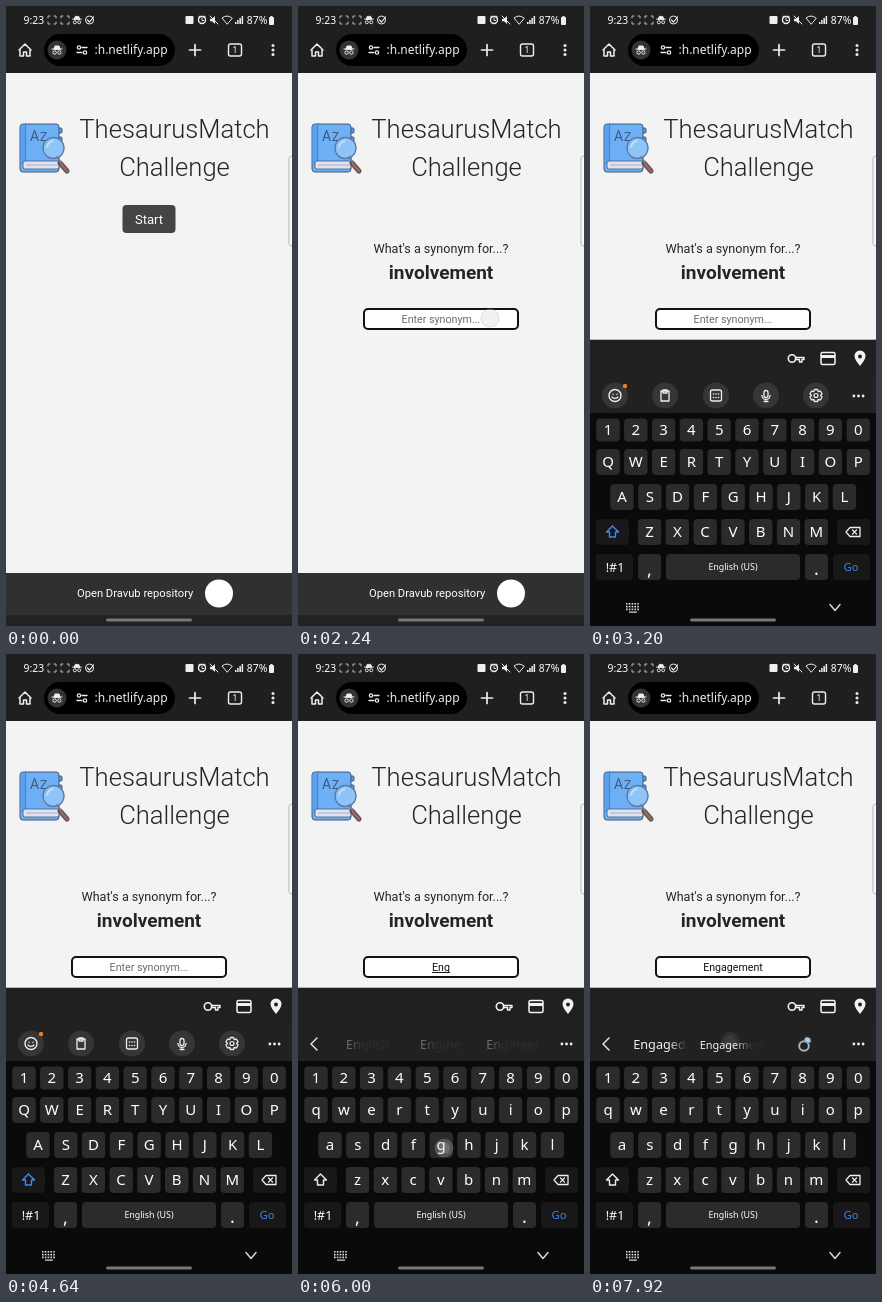
An HTML page with a canvas for the animation above (8000 ms loop, 286x620 px).

```html
<!DOCTYPE html>
<html lang="en">
<head>
<meta charset="utf-8">
<title>ThesaurusMatch Challenge</title>
<style>
html, body { margin: 0; width: 100%; height: 100%; overflow: hidden; background: #1f1f1f; }
canvas { display: block; width: 286px; height: 620px; }
</style>
</head>
<body>
<canvas id="stage"></canvas>
<script>
const W = 286, H = 620, LOOP = 8000;
const canvas = document.getElementById('stage');
const g = canvas.getContext('2d');
const dpr = window.devicePixelRatio || 1;
canvas.width = W * dpr;
canvas.height = H * dpr;

const PAGE_FONT = 'Roboto, sans-serif';
const UI_FONT = '"Noto Sans", sans-serif';
const clamp = v => Math.max(0, Math.min(1, v));
const ramp = (t, start, length) => clamp((t - start) / length);
const mix = (a, b, p) => Math.round(a + (b - a) * p);

function rect(x, y, w, h, fill, radius = 0, stroke, width = 1) {
  g.beginPath();
  g.roundRect(x, y, w, h, radius);
  if (fill) { g.fillStyle = fill; g.fill(); }
  if (stroke) { g.strokeStyle = stroke; g.lineWidth = width; g.stroke(); }
}

function circle(x, y, r, fill, stroke, width = 1) {
  rect(x - r, y - r, 2 * r, 2 * r, fill, r, stroke, width);
}

function text(s, x, y, size, fill = '#fff', font = UI_FONT, weight = 400, align = 'center') {
  g.font = `${weight} ${size}px ${font}`;
  g.textAlign = align;
  g.fillStyle = fill;
  g.fillText(s, x, y);
}

function icon(d, x, y, stroke = '#eee', width = 1.2, fill) {
  const path = new Path2D(d);
  g.save();
  g.translate(x, y);
  g.lineCap = g.lineJoin = 'round';
  if (fill) { g.fillStyle = fill; g.fill(path); }
  if (stroke) { g.strokeStyle = stroke; g.lineWidth = width; g.stroke(path); }
  g.restore();
}

const ICONS = {
  home: 'M-6 0 0-6 6 0M-5-1V6H-1.5V2H1.5V6H5V-1',
  scan: 'M-4-2V-4H-2M2-4H4V-2M4 2V4H2M-2 4H-4V2',
  hat: 'M-5-1H5M-3-1-2-4H2L3-1Z',
  check: 'M-2 0 0 2 4-3',
  alarm: 'M-3.5-3-2-4M3.5-3 2-4M0-1.5V.5H1.5',
  mute: 'M-4-1.3H-2L1-4V4L-2 1.3H-4Z',
  wifi: 'M0 4-5-2Q0-6 5-2Z',
  sliders: 'M0-2.5H5M-5 2.5H0',
  pin: 'M0 8C-3 4-5.5 1-5.5-2A5.5 5.5 0 0 1 5.5-2C5.5 1 3 4 0 8Z',
  key: 'M-.5-1H8V1H6V3.5H3.5V1H-.5',
  smile: 'M-3 1.5Q0 4.5 3 1.5M-2-1.5V-1M2-1.5V-1',
  clipboard: 'M-4-4.5H4V5.5H-4ZM-2-5.5H2V-2.5H-2Z',
  mic: 'M-2-3A2 2 0 0 1 2-3V0A2 2 0 0 1-2 0ZM-4 0A4 4 0 0 0 4 0M0 4V6M-2 6H2',
  gear: 'M-1.5-6H1.5L2.2-4 4.5-4.3 6-1.7 4.6 0 6 1.7 4.5 4.3 2.2 4 1.5 6H-1.5L-2.2 4-4.5 4.3-6 1.7-4.6 0-6-1.7-4.5-4.3-2.2-4Z',
  shift: 'M0-6 6 0H3V5H-3V0H-6Z',
  erase: 'M-7 0-3-4.5H7V4.5H-3ZM-.5-2 3.5 2M3.5-2-.5 2',
  back: 'M3-6-3 0 3 6',
  down: 'M-5-3 0 3 5-3'
};

function drawIncognito(x, y, s = 1) {
  g.save();
  g.translate(x, y);
  g.scale(s, s);
  icon(ICONS.hat, 0, 0, '#eee', 1, '#eee');
  circle(-2.4, 2.5, 1.7, null, '#eee');
  circle(2.4, 2.5, 1.7, null, '#eee');
  g.restore();
}

function drawBrowser() {
  rect(0, 0, W, 67, '#1f1f1f');
  text('9:23', 17.5, 17.7, 10.4, '#fff', UI_FONT, 500, 'left');
  icon(ICONS.scan, 46, 14, '#bbb', 1);
  icon(ICONS.scan, 59, 14, '#bbb', 1);
  drawIncognito(71, 14, .9);
  circle(83.5, 14, 4, null, '#eee');
  icon(ICONS.check, 83.5, 14, '#eee', 1.2);
  rect(179.5, 10, 8, 8, '#eee', 1);
  circle(196, 14, 3.5, null, '#eee', 1.4);
  icon(ICONS.alarm, 196, 14, '#eee', 1);
  icon(ICONS.mute, 208, 14, null, 1, '#eee');
  icon('M-4-4 4 4', 208, 14, '#eee', 1);
  icon(ICONS.wifi, 221, 14, '#eee', 1);
  for (let i = 0; i < 4; i++) rect(229 + 2.2 * i, 16 - 2 * i, 1.5, 2 + 2 * i, '#eee');
  text('87%', 251, 17.7, 10.4, '#fff', UI_FONT, 500);
  rect(263, 11, 5, 8, '#eee', 1);
  rect(264.5, 10, 2, 1, '#eee');

  icon(ICONS.home, 19, 44, '#eee', 1.5);
  rect(38, 28, 131, 32, '#000', 16);
  circle(51, 44, 9.5, '#333');
  drawIncognito(51, 44);
  icon(ICONS.sliders, 76, 44, '#eee', 1.3);
  circle(73, 41.5, 1.7, null, '#eee', 1.2);
  circle(79, 46.5, 1.7, null, '#eee', 1.2);
  text(':h.netlify.app', 88.5, 48, 12, '#eee', UI_FONT, 400, 'left');
  icon('M-5.5 0H5.5M0-5.5V5.5', 189, 44, '#eee', 1.7);
  rect(222.5, 38, 13, 12, null, 2, '#eee', 1.4);
  text('1', 229, 47.3, 8.5);
  for (let i = -1; i < 2; i++) circle(267, 44 + 4.5 * i, 1.5, '#eee');
}

function drawBook() {
  const ink = '#41587c';
  rect(50, 122, 6, 5, '#5f9ade', 1, ink);
  rect(50, 131, 6, 5, '#5f9ade', 1, ink);
  rect(14, 118, 39, 48, '#6db0f6', 3, ink);
  rect(14.5, 118.5, 6, 40, '#5c9fec', 2);
  rect(19, 117.5, 1, 40, '#4d83c4');
  rect(17, 155, 36, 8, '#dfe3f0', 2, ink, .8);
  rect(20, 158.5, 32, 1, '#a9aecb');
  text('A', 28.5, 135, 14, ink, PAGE_FONT);
  text('Z', 37.5, 135, 12, ink, PAGE_FONT);
  icon('M54 157 61 165', 0, 0, '#5b4c50', 5);
  icon('M55 158 61 165', 0, 0, '#96685f', 2.8);
  circle(47.5, 142, 10.5, '#8fc4f8', '#5a7ba6', 1.3);
  icon('M41 141Q42 136 47 135', 0, 0, '#c9e3fc', 1.5);
  icon('M51 151 55 157', 0, 0, '#6e7f99', 2);
}

function drawInput(value, composing) {
  rect(66, 303, 154, 20, '#fff', 4, '#111', 2);
  if (!value) return text('Enter synonym...', 143, 316.7, 10.7, '#6c6c6c', PAGE_FONT);
  text(value, 143, 316.7, 10.65, '#111', PAGE_FONT);
  const width = g.measureText(value).width;
  if (composing) rect(143 - width / 2, 318, width, 1, '#111');
}

const entries = [
  [0, ''], [5060, 'E'], [5430, 'En'], [5910, 'Eng'], [6150, 'Enga'],
  [6390, 'Engag'], [6710, 'Engage'], [7800, 'Engagement']
];

function drawPage(t) {
  rect(0, 67, W, 500, '#f3f3f3');
  drawBook();
  text('ThesaurusMatch', 168.5, 132, 25.6, '#252525', PAGE_FONT, 300);
  text('Challenge', 168.5, 170, 25.6, '#252525', PAGE_FONT, 300);
  if (t < 300) {
    rect(116.5, 199, 53, 28, t > 80 ? '#4d4d4d' : '#444', 4);
    text('Start', 143, 217.7, 13.1, '#fff', PAGE_FONT);
  } else {
    g.globalAlpha = ramp(t, 270, 150);
    text("What's a synonym for...?", 143, 247, 12.6, '#252525', PAGE_FONT);
    text('involvement', 143, 273, 19, '#252525', PAGE_FONT, 700);
    const value = entries.findLast(e => t >= e[0])[1];
    drawInput(value, t < 7800);
    g.globalAlpha = 1;
  }
  rect(283, 150, 8, 90, '#fafafa', 3, '#b5b5b5');
  rect(0, 567, W, 42, '#303030');
  rect(0, 609, W, 11, '#222');
  text('Open Dravub repository', 71, 591, 11.2, '#fff', PAGE_FONT, 400, 'left');
  circle(213, 587.5, 14, '#fff');
}

// Centre of every letter key, by lower-case label
const keys = {};
[['1234567890', 18, 424], ['qwertyuiop', 18, 456], ['asdfghjkl', 32, 491], ['zxcvbnm', 59.5, 526]]
  .forEach(([row, x, y]) => [...row].forEach((label, i) => keys[label] = [x + 27.8 * i, y]));

const presses = [
  ['e', 76, 452, 4950, 5060], ['n', 205, 529, 5310, 5430], ['g', 146, 494, 5830, 5910],
  ['a', 36, 492, 6070, 6150], ['g', 146, 492, 6310, 6390], ['e', 82, 447, 6590, 6710]
];
const taps = [
  ...presses.map(p => p.slice(1)),
  [145, 214, 70, 210], [192, 312, 2070, 2180], [140, 387, 7500, 7790]
];

// [start, left, middle, right]
const suggestions = [
  [5290, 'Everything', 'Email', 'Even'],
  [5520, 'Enough', 'Enjoy', 'End'],
  [5960, 'English', 'Engine', 'Engineer'],
  [6180, 'Engage', 'Engaged', 'Engaging'],
  [6400, 'Engaged', 'Engagement', 'Engage'],
  [6760, 'Engaged', 'Engagement', 'ring'],
  [7800, 'Engaged', 'Engagement', 'ring']
];

function drawRing(x, y) {
  circle(x - 1, y + 2, 4.8, null, '#aab4c0', 2);
  icon('M-2-2 0-5 4-4 5 0 2 1Z', x + 1, y - 2, '#557c9c', .6, '#a5cfe8');
}

// Words too wide for their slot are set smaller; each is uncovered from its left edge.
function drawSuggestions(t) {
  icon(ICONS.back, 16, 390, '#eee', 1.4);
  const [start, ...words] = suggestions.findLast(s => t >= s[0]);
  const alpha = ramp(t, start, 110);
  const edge = .43 * (t - start);
  words.forEach((word, i) => {
    const x = [69.5, 142.5, 215][i];
    if (word === 'ring') return drawRing(x, 390);
    g.font = `12.7px ${UI_FONT}`;
    const fullWidth = g.measureText(word).width;
    const size = 12.7 * Math.min(1, 65.5 / fullWidth);
    const width = Math.min(fullWidth, 65.5);
    const wipe = g.createLinearGradient(x - width / 2, 0, x + width / 2, 0);
    wipe.addColorStop(clamp((edge - 16) / width), `rgba(240,240,240,${alpha})`);
    wipe.addColorStop(clamp(edge / width), `rgba(240,240,240,${edge > width + 16 ? 1 : .05})`);
    text(word, x, 394.5, size, wipe);
  });
}

function drawTools() {
  [25, 75, 126, 176, 226].forEach(x => circle(x, 389.5, 13, '#363636'));
  circle(25, 389.5, 6, null, '#eee', 1.4);
  icon(ICONS.smile, 25, 389.5, '#eee', 1.2);
  icon(ICONS.clipboard, 75, 389.5, '#eee', 1.3);
  rect(120.5, 384, 11, 11, null, 2, '#eee', 1.3);
  for (let i = 0; i < 6; i++) circle(123.5 + 2.5 * (i % 3), 388 + 3.5 * (i / 3 | 0), .8, '#eee');
  icon(ICONS.mic, 176, 389.5, '#eee', 1.3);
  icon(ICONS.gear, 226, 389.5, '#eee', 1.3);
  circle(226, 389.5, 2, null, '#eee', 1.2);
  circle(35, 380, 2.2, '#f37a25');
}

function drawKeys(t) {
  const caps = t < 5060;
  const held = presses.find(p => t >= p[3] && t < p[4]);
  for (const [label, [x, y]] of Object.entries(keys)) {
    const h = y === 424 ? 23 : 26;
    rect(x - 11.7, y - h / 2, 23.4, h, held && held[0] === label ? '#444' : '#2b2b2b', 4);
    text(caps ? label.toUpperCase() : label, x, y + 5.2, 15, '#fff', UI_FONT, 500);
  }
  const dark = '#181818';
  rect(6, 513, 33, 26, dark, 4);
  rect(247, 513, 33, 26, dark, 4);
  rect(6, 548, 37, 26, dark, 4);
  rect(243, 548, 37, 26, dark, 4);
  rect(48, 548, 23, 26, '#2b2b2b', 4);
  rect(76, 548, 134, 26, '#2b2b2b', 4);
  rect(215, 548, 23, 26, '#2b2b2b', 4);
  icon(ICONS.shift, 22.5, 526, caps ? '#4387f5' : '#eee', 1.4);
  icon(ICONS.erase, 263, 526, '#eee', 1.3);
  text('!#1', 25, 565.5, 12.5, '#fff', UI_FONT, 500);
  text(',', 59.5, 570, 18, '#fff', UI_FONT, 500);
  text('English (US)', 143, 564, 8.9, '#fff', UI_FONT, 500);
  text('.', 226.5, 569, 18, '#fff', UI_FONT, 500);
  text('Go', 261, 565, 11.3, '#3f82ed', UI_FONT, 500);

  if (held) {
    const [x, y] = keys[held[0]];
    rect(x - 21, y - 74, 42, 55, '#222', 7);
    text(caps ? held[0].toUpperCase() : held[0], x, y - 37, 25);
  }
}

function drawAutofillBar(t, bottom) {
  const p = ramp(t, 2440, 200);
  if (!p) return;
  const shade = mix(243, 32, p);
  const fill = `rgb(${shade},${shade},${shade})`;
  rect(0, 333, W, 1, `rgba(0,0,0,${.25 * p})`);
  rect(0, 334, W, bottom - 334, fill);
  g.save();
  g.translate(16 * (1 - p), 0);
  g.globalAlpha = .6 + .4 * p;
  circle(202, 352.5, 3.7, null, '#f2f2f2', 1.6);
  icon(ICONS.key, 206, 352.5, '#f2f2f2', 1.4);
  rect(231, 346.5, 14, 12, null, 1.5, '#f2f2f2', 1.5);
  rect(231, 349, 14, 3, '#f2f2f2');
  icon(ICONS.pin, 270, 352, null, 1, '#f2f2f2');
  circle(270, 350.5, 2, fill);
  g.restore();
}

function drawKeyboard(t) {
  if (t < 2280) return;
  const drop = 240 * (1 - ramp(t, 2280, 270)) ** 3;
  drawAutofillBar(t, 373 + drop);
  // The panel rises a little ahead of its keys
  const top = 372 + Math.max(0, drop - 4);
  rect(0, top, W, H - top, '#212121');
  g.save();
  g.translate(0, drop);
  rect(0, 407, W, 213, '#0a0a0a');
  if (t < 5240) drawTools(); else if (t >= 5290) drawSuggestions(t);
  for (let i = -1; i < 2; i++) circle(268.5 + 4.6 * i, 390, 1.4, '#eee');
  drawKeys(t);
  g.restore();

  rect(0, 584, W, 36, '#0a0a0a');
  for (let i = 0; i < 15; i++) rect(36 + 2.8 * (i % 5), 597 + 2.8 * (i / 5 | 0), 1.6, 1.6, '#ddd');
  rect(39, 605.5, 8, 1.2, '#ddd');
  icon(ICONS.down, 245, 601.5, '#ddd', 1.4);
}

function drawTouches(t) {
  for (const [x, y, down, up] of taps) {
    const alpha = ramp(t, down, 40) * (1 - ramp(t, up, 150));
    if (!alpha) continue;
    g.globalAlpha = alpha;
    circle(x, y, 9, 'rgba(222,222,230,.6)', 'rgba(165,165,205,.5)', 1.2);
    circle(x, y, 6, 'rgba(235,235,240,.45)');
    g.globalAlpha = 1;
  }
}

function draw(t) {
  g.setTransform(dpr, 0, 0, dpr, 0, 0);
  drawBrowser();
  drawPage(t);
  drawKeyboard(t);
  rect(100, 612.5, 86, 3, '#777', 1.5);
  drawTouches(t);
}

const began = performance.now();
(function frame() {
  draw((performance.now() - began) % LOOP);
  requestAnimationFrame(frame);
})();
</script>
</body>
</html>
```
